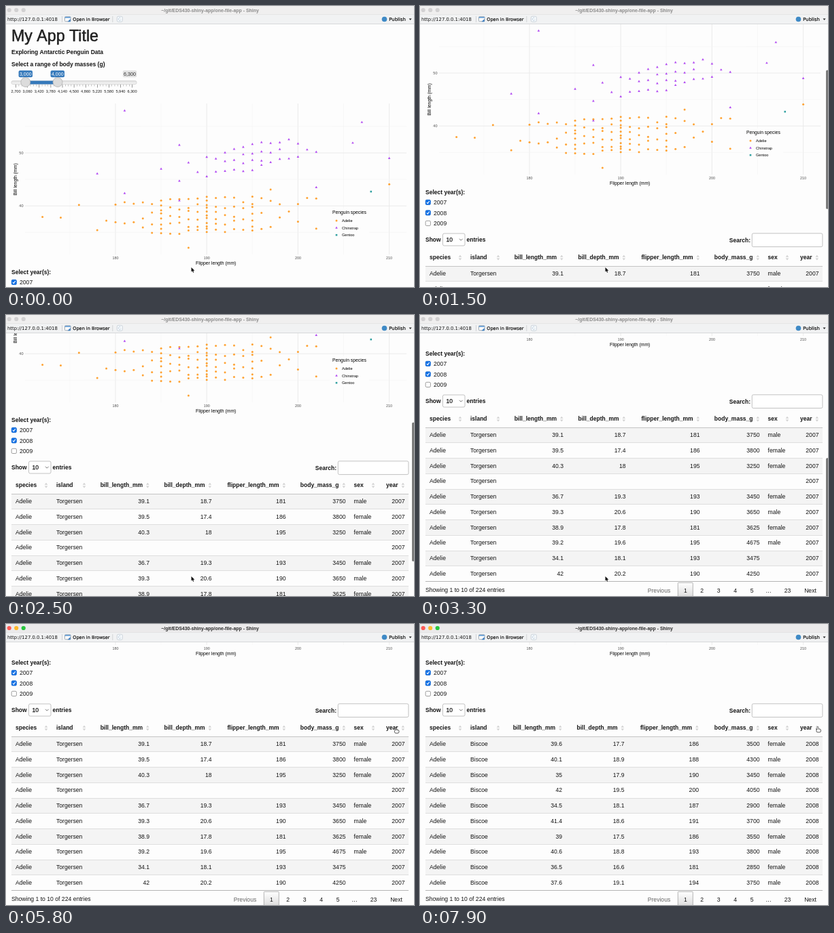
An HTML page with a canvas that plays this animation: 600 px wide and 415 px high, repeating every 8 s.

```html
<!DOCTYPE html>
<html lang="en">
<head>
<meta charset="utf-8">
<title>Penguin app</title>
<style>
html, body { margin: 0; width: 100%; height: 100%; overflow: hidden; background: #fdfdfd; }
canvas { display: block; width: 600px; height: 415px; }
</style>
</head>
<body>
<canvas id="stage"></canvas>
<script>
const W = 600, H = 415, LOOP = 8000, TOP = 27;
const SANS = '"Liberation Sans", Arial, sans-serif';
const UI = '"DejaVu Sans", Verdana, sans-serif';
const BODY = 8.65, BOLD = 8.5, INK = '#141414', PAPER = '#fdfdfd';
const ORANGE = '#ff8c00', PURPLE = '#a020f0', TEAL = '#008b8b';

const canvas = document.getElementById('stage');
const c = canvas.getContext('2d');
const dpr = window.devicePixelRatio || 1;
canvas.width = W * dpr;
canvas.height = H * dpr;

// Table text: bill length, bill depth, flipper length, mass, sex
const rows2007 = `39.1 18.7 181 3750 male|39.5 17.4 186 3800 female|40.3 18 195 3250 female||36.7 19.3 193 3450 female|39.3 20.6 190 3650 male|38.9 17.8 181 3625 female|39.2 19.6 195 4675 male|34.1 18.1 193 3475|42 20.2 190 4250`.split('|');
const rows2008 = `39.6 17.7 186 3500 female|40.1 18.9 188 4300 male|35 17.9 190 3450 female|42 19.5 200 4050 male|34.5 18.1 187 2900 female|41.4 18.6 191 3700 male|39 17.5 186 3550 female|40.6 18.8 193 3800 male|36.5 16.6 181 2850 female|37.6 19.1 194 3750 male`.split('|');

// Numeric columns are anchored right, the others left
const columns = [
  { name: 'species', x: 14, icon: 59 },
  { name: 'island', x: 74, icon: 115 },
  { name: 'bill_length_mm', x: 211, right: true, shift: -2 },
  { name: 'bill_depth_mm', x: 302.5, right: true, shift: -2 },
  { name: 'flipper_length_mm', x: 411.5, right: true, shift: -1.5 },
  { name: 'body_mass_g', x: 499.5, right: true },
  { name: 'sex', x: 511.5, icon: 540 },
  { name: 'year', x: 586.5, right: true }
];

function text(str, x, y, size = BODY, { bold, color = INK, align = 'left', font = SANS, heft = 0 } = {}) {
  c.font = `${bold ? 'bold ' : ''}${size}px ${font}`;
  c.fillStyle = c.strokeStyle = color;
  c.textAlign = align;
  c.lineJoin = 'round';
  c.fillText(str, x, y + size * 0.36);
  if (heft) {
    c.lineWidth = heft;
    c.strokeText(str, x, y + size * 0.36);
  }
}
function rect(x, y, w, h, fill) {
  c.fillStyle = fill;
  c.fillRect(x, y, w, h);
}
function box(x, y, w, h, r, fill, stroke) {
  c.beginPath();
  c.roundRect(x, y, w, h, r);
  if (fill) { c.fillStyle = fill; c.fill(); }
  if (stroke) { c.strokeStyle = stroke; c.lineWidth = 0.7; c.stroke(); }
}
function disc(x, y, r, fill, stroke) {
  box(x - r, y - r, 2 * r, 2 * r, r, fill, stroke);
}
function poly(points, fill) {
  c.beginPath();
  points.forEach(p => c.lineTo(...p));
  c.closePath();
  c.fillStyle = fill;
  c.fill();
}
function line(points, color, width) {
  c.beginPath();
  points.forEach(p => c.lineTo(...p));
  c.strokeStyle = color;
  c.lineWidth = width;
  c.stroke();
}
function fade(y0, y1, from, to) {
  const g = c.createLinearGradient(0, y0, 0, y1);
  g.addColorStop(0, from);
  g.addColorStop(1, to);
  return g;
}
const smooth = u => u * u * (3 - 2 * u);
const bell = (x, mid, sd) => Math.exp(-(((x - mid) / sd) ** 2) / 2);
const ramp = (t, t0, t1) => Math.min(1, Math.max(0, (t - t0) / (t1 - t0)));

function seeded(seed) {
  return () => (seed = (seed * 16807) % 2147483647) / 2147483647;
}

// Each flipper length gets a bell-shaped count of bills, spread evenly with jitter
function cloud({ seed, from, to, mid, sd, peak, extra, center, slope, spread, strays }) {
  const rand = seeded(seed);
  const points = [...strays];
  for (let f = from; f <= to; f++) {
    const n = Math.round((peak + (f % 5 ? 0 : extra)) * bell(f, mid, sd)) || 1;
    for (let i = 0; i < n; i++) {
      const u = (i + 0.2 + 0.6 * rand()) / n * 2 - 1;
      points.push([f, center + slope * (f - mid) + u * spread]);
    }
  }
  return points;
}
const adelie = cloud({
  seed: 41, from: 178, to: 200, mid: 189.5, sd: 5.5, peak: 6, extra: 5,
  center: 38.2, slope: 0.05, spread: 3.7,
  strays: [[172, 37.9], [174, 37.8], [176, 40.2], [188, 32.1], [197, 43.1], [201, 41.5], [202, 41.4], [202, 35.7], [210, 44.1]]
});
const chinstrap = cloud({
  seed: 7, from: 187, to: 201, mid: 195, sd: 4.5, peak: 3.6, extra: 0.4,
  center: 49.2, slope: 0.35, spread: 2.8,
  strays: [[178, 46.1], [181, 58], [181, 42.4], [185, 47], [187, 51.5], [187, 41], [202, 50.2], [202, 43.5], [206, 51.9], [207, 55.8], [210, 49]]
});

const dot = (x, y) => disc(x, y, 1.5, ORANGE);
const tri = (x, y) => poly([[x, y - 2], [x + 1.8, y + 1.2], [x - 1.8, y + 1.2]], PURPLE);
const square = (x, y) => rect(x - 1.3, y - 1.3, 2.6, 2.6, TEAL);
const species = [
  { name: 'Adelie', points: adelie, mark: dot },
  { name: 'Chinstrap', points: chinstrap, mark: tri },
  { name: 'Gentoo', points: [[208, 42.7]], mark: square }
];
const px = flipper => 161 + (flipper - 180) * 13.42;
const py = bill => 217 + (50 - bill) * 7.82;

function plot() {
  const grid = (points, major) => line(points, major ? '#e9e9e9' : '#f3f3f3', major ? 0.9 : 0.6);
  for (let f = 175; f <= 210; f += 5) grid([[px(f), 144], [px(f), 367]], f % 10 === 0);
  for (let b = 35; b <= 55; b += 5) grid([[28, py(b)], [589, py(b)]], b % 10 === 0);

  const tick = { color: '#4d4d4d' };
  for (let f = 180; f <= 210; f += 10) text(f, px(f), 372.5, 5.4, { ...tick, align: 'center' });
  for (const b of [40, 50]) text(b, 25.5, py(b), 5.6, { ...tick, align: 'right' });
  const label = { color: '#000', align: 'center' };
  text('Flipper length (mm)', 308.7, 379.5, 6.85, label);
  c.save();
  c.translate(14, 256);
  c.rotate(-Math.PI / 2);
  text('Bill length (mm)', 0, 0, 6.85, label);
  c.restore();

  rect(476, 299, 58, 45, PAPER);
  text('Penguin species', 480, 305, 6.8, { color: '#000' });
  species.forEach(({ name, points, mark }, i) => {
    const y = 317 + i * 10.6;
    text(name, 494, y, 5.6, { color: '#000' });
    c.globalAlpha = 0.8;
    mark(486, y);
    points.forEach(([f, b]) => mark(px(f), py(b)));
    c.globalAlpha = 1;
  });
}

function slider() {
  text('Select a range of body masses (g)', 8, 86.3, BOLD, { bold: true });
  box(8, 110.5, 184, 5, 2, fade(110, 116, '#dcdcdc', '#fafafa'), '#ccc');
  rect(29, 110.5, 47, 5, '#3579bb');
  for (let i = 0; i <= 40; i++) {
    const major = i % 4 === 0;
    rect(14.3 + i * 4.275, 116, 0.6, major ? 4.5 : 2.5, major ? '#555' : '#999');
  }
  for (let i = 0; i <= 10; i++)
    text((2700 + i * 360).toLocaleString('en-US'), 14.5 + i * 17.1, 126.3, 5.6, { align: 'center' });
  const tag = (str, x, fill, color) => {
    box(x - 10.2, 95.2, 20.4, 10, 2, fill);
    text(str, x, 100.3, 7.1, { color, align: 'center' });
  };
  tag('3,000', 28.8, '#3579bb', '#fff');
  tag('4,000', 75.8, '#3579bb', '#fff');
  tag('6,300', 182, '#e1e1e1', '#333');
  for (const x of [28.8, 76]) disc(x, 112.5, 7, '#dcdcdc', '#ababab');
}

function controls() {
  const head = { bold: true };
  text('Select year(s):', 8, 393, BOLD, head);
  [2007, 2008, 2009].forEach((year, i) => {
    const y = 408 + i * 15.5;
    const on = year < 2009;
    box(8.2, y - 3.7, 7.2, 7.2, 1.6, on ? '#1271e6' : '#fff', on ? '#0d62cc' : '#777');
    if (on) line([[9.9, y], [11.3, y + 1.6], [13.8, y - 2]], '#fff', 1.1);
    text(year, 20, y + 0.3);
  });
  text('Show', 8, 463, BOLD, head);
  box(33.5, 454, 32.5, 18, 2, '#fff', '#aaa');
  text('10', 38.5, 463, BODY, { heft: 0.25 });
  line([[58, 461.8], [60.3, 464.2], [62.6, 461.8]], '#555', 0.8);
  text('entries', 68.5, 463, BOLD, head);
  text('Search:', 486, 464, BOLD, { bold: true, align: 'right' });
  box(488.3, 453.8, 103.6, 19.8, 2, '#fff', '#aaa');
}

function sortIcon(x, y, order) {
  const arrow = (dir, on) => poly(
    [[x - 2.3, y + dir * 0.9], [x + 2.3, y + dir * 0.9], [x, y + dir * 3.9]], on ? '#777' : '#d2d2d2');
  arrow(-1, order === 'asc');
  arrow(1, order === 'desc');
}

function table(t) {
  const sorted = t >= 7400;
  const order = sorted ? 'desc' : t >= 6400 ? 'asc' : '';
  const pitch = 22.75, y0 = 501.6;
  const cellX = col => col.x + (sorted && col.shift || 0);

  for (const col of columns) {
    const x = cellX(col), align = col.right ? 'right' : 'left';
    text(col.name, col.right ? x - 10 : x, 489.3, BOLD, { bold: true, align });
    sortIcon(col.icon || x - 2.7, 489.6, col.name === 'year' && order);
  }
  (sorted ? rows2008 : rows2007).forEach((row, i) => {
    const y = Math.round(y0 + i * pitch);
    if (i % 2 === 0) rect(8, y, 584, pitch, '#f4f4f4');
    rect(8, y, 584, 1, i ? '#dedede' : '#c4c4c4');
    const cells = ['Adelie', sorted ? 'Biscoe' : 'Torgersen', ...row.split(' ')];
    cells[7] = sorted ? '2008' : '2007';
    columns.forEach((col, k) => text(cells[k] || '', cellX(col), y0 + (i + 0.5) * pitch,
      BODY, { align: col.right ? 'right' : 'left' }));
  });
  rect(8, 729, 584, 1, '#b4b4b4');
}

function pager() {
  text('Showing 1 to 10 of 224 entries', 8, 741.8);
  box(379.3, 731.3, 22, 22.5, 1, fade(731, 753, '#fff', '#dcdcdc'), '#979797');
  const item = (str, x, color) => text(str, x, 742.5, BODY, { align: 'center', color });
  item('Previous', 351.5, '#666');
  [...'12345…'].forEach((s, i) => item(s, 390.3 + i * 24.45));
  item('23', 540.5);
  item('Next', 574);
}

// Two flicks of different speed carry the page down 336 px
function scrollAt(t) {
  return 60.5 * ramp(t, 100, 700) + 57.5 * ramp(t, 700, 1500)
    + 120 * ramp(t, 1500, 2500) + 98 * ramp(t, 2500, 3200);
}

function page(t) {
  const scroll = scrollAt(t);
  c.save();
  c.beginPath();
  c.rect(0, TOP, W, H - TOP);
  c.clip();
  c.translate(0, -scroll);
  text('My App Title', 8, 44, 23.2, { color: '#212121', heft: 0.55 });
  text('Exploring Antarctic Penguin Data', 8, 68, BOLD, { bold: true });
  slider();
  plot();
  controls();
  table(t);
  pager();
  c.restore();

  if (t >= 200) {
    c.globalAlpha = 1 - ramp(t, 3400, 3700);
    box(597, 31.5 + scroll * 0.535, 4, 205, 1.5, '#7b7b7b');
    c.globalAlpha = 1;
  }
}

function chrome(active) {
  rect(0, 0, W, 12.5, active ? '#ebeaeb' : '#f0efef');
  rect(0, 12.5, W, TOP - 12.5, '#f1f2f3');
  rect(0, 12, W, 0.6, '#dcdcdc');
  rect(0, TOP - 1, W, 1, '#d6d8da');
  const lights = active ? ['#fc5b57', '#fdb92c', '#29c53f'] : Array(3).fill('#d2d1d2');
  lights.forEach((fill, i) => disc(4.7 + i * 10.5, 6, 3.1, fill));
  text('~/git/EDS430-shiny-app/one-file-app - Shiny', 300, 6, 6.95,
    { bold: true, align: 'center', color: active ? '#2c2c2c' : '#8a8a8a' });

  const ui = { font: UI, color: '#111' };
  text('http://127.0.0.1:4018', 2, 19.5, 6.9, ui);
  text('Open in Browser', 98.3, 19.5, 6.55, { ...ui, heft: 0.2 });
  text('Publish', 563.3, 19.5, 6.9, { ...ui, heft: 0.2 });
  for (const x of [82, 156.5]) rect(x, 15, 0.7, 9, '#c6c8ca');
  box(86.5, 15.7, 8.5, 7, 1, '#fff', '#7d8b99');
  rect(86.8, 16, 8, 1.8, '#6aa2d8');
  poly([[90.5, 23.3], [94.8, 23.3], [94.8, 19]], '#3f7fc0');
  box(163.3, 15.3, 8, 8, 2, '#f7fafc', '#b9c4ce');
  c.beginPath();
  c.arc(167.3, 19.3, 2, 0.4, 5.4);
  c.strokeStyle = '#b3c6d8';
  c.lineWidth = 0.8;
  c.stroke();
  disc(556.5, 19.5, 3.8, '#3f8ac6');
  poly([[592.6, 18.6], [596.6, 18.6], [594.6, 20.9]], '#222');
}

function arrowPointer() {
  c.beginPath();
  [[0, 0], [0, 6.6], [1.5, 5.3], [2.6, 7.8], [3.8, 7.3], [2.7, 4.9], [4.8, 4.8]].forEach(p => c.lineTo(...p));
  c.closePath();
  c.strokeStyle = '#fff';
  c.lineWidth = 0.9;
  c.stroke();
  c.fillStyle = '#111';
  c.fill();
}
function handPointer() {
  box(-0.9, 0, 1.8, 5, 0.9, '#fff', '#111');
  box(-2, 3.4, 6.4, 4.8, 1.8, '#fff', '#111');
  rect(-0.5, 1, 1, 4, '#fff');
}

function mouse(t) {
  const rise = smooth(ramp(t, 3700, 4600));
  const reach = smooth(ramp(t, 4900, 5700));
  const nudge = smooth(ramp(t, 5800, 6400));
  c.save();
  c.translate(272.5 + 276 * rise + 25 * reach + 11.5 * nudge, 386 - 228 * rise - 5 * reach - 1.3 * nudge);
  if (t >= 4600) handPointer(); else arrowPointer();
  c.restore();
}

function draw(now) {
  const t = Math.floor(now % LOOP / 100) * 100;
  c.setTransform(dpr, 0, 0, dpr, 0, 0);
  rect(0, 0, W, H, PAPER);
  page(t);
  chrome(t >= 5000);
  mouse(t);
}

let start;
function frame(now) {
  start ??= now;
  draw(now - start);
  requestAnimationFrame(frame);
}
draw(0);
requestAnimationFrame(frame);
</script>
</body>
</html>
```
